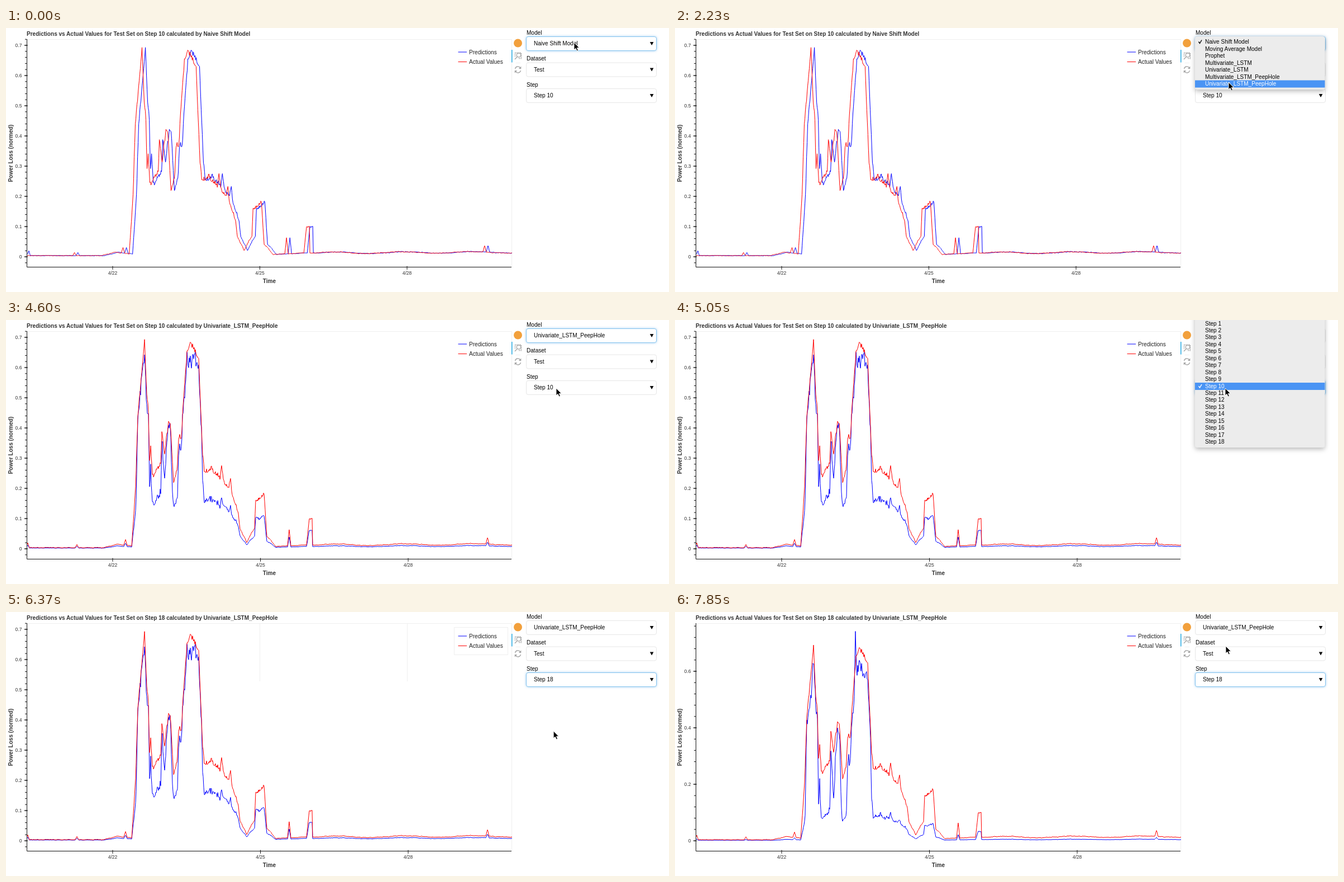
Write an HTML page that moves like this. It is 1187 by 472 pixels and loops after 8 s.

```html
<!DOCTYPE html>
<html lang="en">
<head>
<meta charset="utf-8">
<title>Power loss forecast</title>
<style>
  html, body { margin: 0; width: 100%; height: 100%; overflow: hidden; background: #fff; }
  svg { display: block; width: 1187px; height: 472px; font: 10.05px "Liberation Sans", Arial, sans-serif; }
  .bold { font-weight: bold; fill: #333; }
  .tick { font-size: 8.6px; fill: #333; }
  .axis { stroke: #111; fill: none; }
  .line { fill: none; stroke-linejoin: round; }
  .pred { stroke: #00f; }
  .real { stroke: #f00; }
  .faint { fill: none; stroke: #efefef; }
  .icon { fill: none; stroke: #a5a5a5; stroke-width: 1.3; }
  .box { fill: #fff; stroke: #e6e6e6; }
  .focus { stroke: #84c3ee; filter: drop-shadow(0 0 2px rgba(102, 175, 233, .6)); }
  .sheet { fill: #ececec; filter: drop-shadow(0 3px 4px rgba(0, 0, 0, .28)); }
</style>
</head>
<body>
<svg id="stage" viewBox="0 0 1187 472" xmlns="http://www.w3.org/2000/svg">
  <clipPath id="frame"><rect x="37" y="20" width="869" height="407"/></clipPath>
</svg>
<script>
const LOOP = 8000, TICK = LOOP / 54, ZERO = 409;
const MODELS = ["Naive Shift Model", "Moving Average Model", "Prophet", "Multivariate_LSTM",
  "Univariate_LSTM", "Multivariate_LSTM_PeepHole", "Univariate_LSTM_PeepHole"];
const STEPS = Array.from({ length: 18 }, (_, i) => `Step ${i + 1}`);
const MENUS = {
  model: { items: MODELS, first: 24.5, pitch: 12.5, top: 15, bottom: 110, checked: 0 },
  step: { items: STEPS, first: 6, pitch: 12.45, top: -12, bottom: 228, checked: 9 }
};

// tick, x, y of the pointer where a move starts or ends
const MOVES = [
  [2, 1017, 26], [5, 989, 71], [8, 989, 20], [13, 989, 20], [15, 991, 97], [25, 991, 97],
  [26, 986, 96], [31, 985, 122], [35, 985, 122], [40, 980, 215], [42, 980, 215],
  [46, 981, 201], [49, 978, 160], [53, 986, 61]
];

const LAST = MODELS[6];
const SCENES = [
  { t: 0, model: MODELS[0], step: 10, chart: 0, focus: 0 },
  { t: 1780, model: MODELS[0], step: 10, chart: 0, focus: 0, menu: "model" },
  { t: 3870, model: LAST, step: 10, chart: 0, focus: 0, redraw: true },
  { t: 4020, model: LAST, step: 10, chart: 1, focus: 0 },
  { t: 5050, model: LAST, step: 10, chart: 1, focus: 2, menu: "step" },
  { t: 6230, model: LAST, step: 18, chart: 1, focus: 2, redraw: true },
  { t: 6380, model: LAST, step: 18, chart: 2, focus: 2 }
];

// Main bends of the measured series
const BENDS = [
  [37, 407], [175, 407], [200, 401], [225, 404], [232, 300], [236, 172], [248, 40], [252, 138],
  [255, 160], [257, 262], [265, 279], [277, 255], [279, 202], [284, 238], [291, 180], [294, 182],
  [300, 290], [307, 262], [309, 214], [314, 212], [317, 150], [324, 58], [330, 43], [345, 68],
  [352, 238], [355, 270], [365, 265], [402, 302], [416, 346], [419, 374], [431, 397], [445, 372],
  [447, 324], [462, 314], [467, 386], [483, 405], [538, 402], [543, 354], [548, 355], [549, 402],
  [912, 401]
];
// x, height
const SPIKES = [[39, 9], [127, 6], [214, 11], [259, 40], [386, 25], [402, 23], [507, 29], [862, 12]];

const clamp = v => Math.min(1, Math.max(0, v));
const ease = v => clamp(v) ** 2 * (3 - 2 * clamp(v));
const spike = (x, at, width) => Math.max(0, 1 - Math.abs(x - at) / width);

// Value of column `col` at `x` in a table sorted by its first column
function between(table, x, col = 1, shape = clamp) {
  const i = table.findIndex(p => p[0] > x);
  if (i < 0) return table[table.length - 1][col];
  if (i === 0) return table[0][col];
  const a = table[i - 1], b = table[i];
  return a[col] + (b[col] - a[col]) * shape((x - a[0]) / (b[0] - a[0]));
}

function random(i, seed) {
  const v = Math.sin(i * 12.9898 + seed * 78.233) * 43758.5453;
  return (v - Math.floor(v)) * 2 - 1;
}

// Slow drift plus jitter
function noise(x, seed) {
  const i = Math.floor(x / 4), f = x / 4 - i;
  return .6 * (random(i, seed) * (1 - f) + random(i + 1, seed) * f) + .5 * random(x, seed + 9);
}

function measured(x) {
  let h = ZERO - between(BENDS, x);
  if (x > 549) h += 1.5 * Math.cos((x - 590) * Math.PI / 62);
  for (const [at, size] of SPIKES) h += size * spike(x, at, 3);
  return Math.max(1, h + noise(x, 1) * Math.min(9, .5 + h * .05));
}

// Forecasts fall short of low values more than of high ones
function forecast(x, low, high, seed) {
  const h = measured(x);
  const p = h * (low + (high - low) * ease((h - 135) / 92));
  return Math.max(1, p + noise(x, seed) * Math.min(22, p * .08));
}

function curve(fn, shift = x => x, scale = 1) {
  let d = "";
  for (let x = 37; x <= 915; x++)
    d += `${d ? "L" : "M"}${shift(x).toFixed(1)} ${(ZERO - fn(x) * scale).toFixed(1)}`;
  return d;
}

const early = x => x - 4.5 - (x - 248) * .0012;
const late = x => early(x) + 6.1;
const near = x => forecast(x, .62, .94, 2);
const far = x => forecast(x, .33, .9, 3) + 110 * spike(x, 323, 2);

const FINE = { unit: 540, major: .1, minor: .02 };
const COARSE = { unit: 505, major: .2, minor: .04 };
const CHARTS = [
  { ...FINE, pred: curve(measured, late), real: curve(measured, early), day3: 263.5 },
  { ...FINE, pred: curve(near), real: curve(measured), day3: 264.5 },
  { ...COARSE, pred: curve(far, undefined, .935), real: curve(measured, undefined, .935), day3: 264.5 }
];

const stage = document.getElementById("stage");

function el(parent, tag, attrs = {}, content) {
  const node = document.createElementNS(stage.namespaceURI, tag);
  for (const k in attrs) node.setAttribute(k, attrs[k]);
  if (content !== undefined) node.textContent = content;
  parent.append(node);
  return node;
}
const text = (parent, x, y, content, attrs = {}) => el(parent, "text", { x, y, ...attrs }, content);
const path = (parent, d, cls) => el(parent, "path", { d, class: cls });
const show = (node, on) => node.setAttribute("visibility", on ? "visible" : "hidden");

function drawChart({ pred, real, unit, major, minor, day3 }) {
  const g = el(stage, "g");
  const lines = el(g, "g", { "clip-path": "url(#frame)" });
  path(lines, pred, "line pred");
  path(lines, real, "line real");
  let ticks = "M37.5 20V427.5H905";
  for (let y = ZERO + minor * unit; y > 20; y -= minor * unit)
    if (y < 427) ticks += `M34 ${y.toFixed(1)}H37`;
  for (let v = 0; ZERO - v * unit > 25; v += major) {
    const y = ZERO - v * unit;
    ticks += `M32.5 ${y.toFixed(1)}H39`;
    text(g, 28.5, y + 3, v ? v.toFixed(1) : "0", { class: "tick", "text-anchor": "end" });
  }
  for (let i = 0; i < 3; i++) {
    const x = 191 + i * day3;
    ticks += `M${x} 425.5V432`;
    text(g, x, 441, `4/${22 + 3 * i}`, { class: "tick", "text-anchor": "middle" });
  }
  path(g, ticks, "axis");
  return g;
}

function drawMenu({ items, first, pitch, top, bottom, checked }) {
  const g = el(stage, "g");
  el(g, "rect", { x: 931, y: top, width: 232.5, height: bottom - top, rx: 4, class: "sheet" });
  const bar = el(g, "rect", { x: 931, width: 232.5, height: 13, fill: "#4a94f4" });
  const rows = items.map((s, i) => text(g, 949, first + i * pitch + 3.5, s));
  const mark = el(g, "path", {
    d: `M937.5 ${first + checked * pitch}l2 3 3.5 -6`, fill: "none", "stroke-width": 1.4
  });
  return {
    g,
    hover(y) {
      const n = Math.min(items.length - 1, Math.max(0, Math.round((y - first) / pitch)));
      bar.setAttribute("y", first + n * pitch - 6);
      rows.forEach((r, i) => r.setAttribute("fill", i === n ? "#fff" : "#000"));
      mark.setAttribute("stroke", n === checked ? "#fff" : "#000");
    }
  };
}

path(stage, "M37 20.5H905.5V427", "faint");
const redraw = path(stage, "M454.5 20V124M718.5 20V124M802.5 27.5H898.5V76.5H802.5Z", "faint");
const charts = CHARTS.map(drawChart);
const title = text(stage, 37, 14, "", { class: "bold" });
text(stage, 471.5, 456, "Time", { class: "bold", "text-anchor": "middle" });
text(stage, 0, 0, "Power Loss (normed)", {
  class: "bold", "text-anchor": "middle", transform: "translate(11.5 224) rotate(-90)"
});
[["Predictions", "pred", 43], ["Actual Values", "real", 60.5]].forEach(([name, cls, y]) => {
  path(stage, `M809.5 ${y}H825`, `line ${cls}`);
  text(stage, 829, y + 3.5, name, { fill: "#222" });
});

// Toolbar
el(stage, "circle", { cx: 916.5, cy: 27, r: 7.5, fill: "#f2a03c" });
el(stage, "rect", { x: 905, y: 39, width: 1.5, height: 22.5, fill: "#26aae1" });
path(stage, "M911.5 51V44.5H922.5V54.5H918", "icon").setAttribute("stroke-dasharray", "2 1");
el(stage, "circle", { cx: 918, cy: 48.5, r: 3.7, class: "icon" });
path(stage, "M915.3 51.3L911 56", "icon");
path(stage, "M912.5 62.5H921", "faint");
path(stage, "M911.5 73A5 5 0 0 1 920.5 71M921.5 76A5 5 0 0 1 912.5 78", "icon");
el(stage, "path", { d: "M922.3 68.5V73H917.8ZM910.7 80.5V76H915.2Z", fill: "#a5a5a5" });

const selects = ["Model", "Dataset", "Step"].map((name, i) => {
  const y = 15.5 + i * 46.5;
  text(stage, 932, y - 4, name);
  const box = el(stage, "rect", { x: 931.5, y, width: 233, height: 25, rx: 3.5 });
  const value = text(stage, 945, y + 15.5, "Test");
  el(stage, "path", { d: `M1152.8 ${y + 9.5}h6.6l-3.3 6Z` });
  return { box, value };
});

const menus = {};
for (const k in MENUS) menus[k] = drawMenu(MENUS[k]);
const pointer = el(stage, "path", {
  d: "M0 0V13L3 10.3 5.2 15 7.4 14 5.3 9.4H9.4Z",
  stroke: "#fff", "stroke-width": .9
});

let lastScene;
function render(t) {
  const scene = SCENES.findLast(s => s.t <= t);
  const tick = Math.floor(t / TICK + .05);
  const x = between(MOVES, tick, 1, ease), y = between(MOVES, tick, 2, ease);
  pointer.setAttribute("transform", `translate(${x} ${y})`);
  if (scene.menu) menus[scene.menu].hover(y);
  if (scene === lastScene) return;
  lastScene = scene;
  title.textContent = `Predictions vs Actual Values for Test Set on Step ${scene.step} calculated by ${scene.model}`;
  selects[0].value.textContent = scene.model;
  selects[2].value.textContent = `Step ${scene.step}`;
  selects.forEach((s, i) => s.box.setAttribute("class", i === scene.focus ? "box focus" : "box"));
  charts.forEach((g, i) => show(g, i === scene.chart));
  for (const k in menus) show(menus[k].g, k === scene.menu);
  show(redraw, scene.redraw);
}

const start = performance.now();
function play() {
  render((performance.now() - start) % LOOP);
  requestAnimationFrame(play);
}
play();
</script>
</body>
</html>
```
